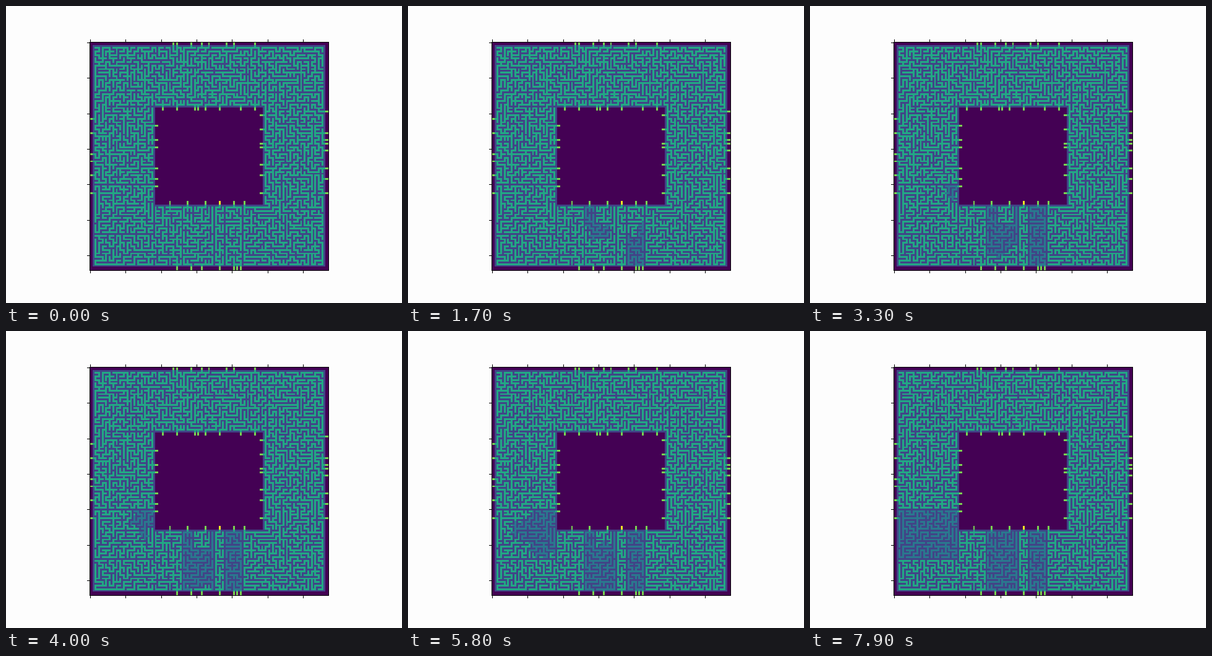
An HTML page with a canvas for the animation above (8 s loop, 640x480 px).

```html
<!DOCTYPE html>
<html lang="en">
<head>
<meta charset="utf-8">
<title>Maze search</title>
<style>
html, body { margin: 0; width: 640px; height: 480px; overflow: hidden; background: #fdfdfd; }
canvas { display: block; }
</style>
</head>
<body>
<canvas id="stage" width="640" height="480"></canvas>
<script>
const LOOP = 8000, STEP = 100;
const COLS = 135, ROWS = 129, RING = 35, EDGE = 2;
const SIZE = 369.6 / ROWS, LEFT = 328 - COLS * SIZE / 2, TOP = 57.6;
const INNER = EDGE + RING;
const COLOR = {
  page: '#fdfdfd', empty: '#440154', wall: '#414487', seen: '#2a788e',
  path: '#22a884', label: '#7ad151', start: '#fde725'
};

// Parts of the maze that get searched, each from its own entry cell
const FLOODS = [
  { cols: [59, 67], rows: [93, 101], entry: [61, 101], start: 4600, end: 7900 },
  { cols: [53, 69], rows: [93, 125], entry: [55, 93], start: 0, end: 4200 },
  { cols: [77, 85], rows: [93, 125], entry: [83, 125], start: 0, end: 2600 },
  { cols: [3, 35], rows: [81, 107], entry: [35, 81], start: 2800, end: 7900 }
];

// Openings along each side of the outer and the inner wall
const PORTALS = {
  outer: {
    top: [47, 49, 57, 63, 67, 77, 81, 93],
    bottom: [49, 57, 63, 73, 81, 83, 85],
    left: [43, 51, 63, 67, 75, 85],
    right: [39, 51, 55, 57, 61, 71, 77, 85]
  },
  inner: {
    top: [41, 49, 59, 61, 65, 73, 85, 93],
    bottom: [45, 55, 65, 73, 81, 87],
    left: [47, 55, 59, 71, 77, 81],
    right: [41, 49, 57, 59, 69, 75, 85]
  }
};

let seed = 20;
function random() {
  seed = (Math.imul(seed, 1664525) + 1013904223) >>> 0;
  return seed / 4294967296;
}
const pick = n => Math.floor(random() * n);

const key = (c, r) => r * COLS + c;
const within = (v, [low, high]) => v >= low && v <= high;
// Distance of a cell from the nearest outer edge
const inset = (c, r) => Math.min(c, r, COLS - 1 - c, ROWS - 1 - r);
const isRoom = (c, r) => c % 2 === 1 && r % 2 === 1 && inset(c, r) > EDGE && inset(c, r) < INNER;
const floodAt = (c, r) => FLOODS.find(f => within(c, f.cols) && within(r, f.rows));

const cells = new Map();   // open cells with their depth and, if searched, time

function growMaze(c0, r0) {
  const flood = floodAt(c0, r0);
  const first = { c: c0, r: r0, depth: 0, time: Infinity };
  const active = [first], found = [first];
  cells.set(key(c0, r0), first);
  while (active.length) {
    const at = random() < 0.55 ? active.length - 1 : pick(active.length);
    const room = active[at];
    const exits = [[1, 0], [-1, 0], [0, 1], [0, -1]].filter(([dc, dr]) => {
      const c = room.c + 2 * dc, r = room.r + 2 * dr;
      return isRoom(c, r) && !cells.has(key(c, r)) && floodAt(c, r) === flood;
    });
    if (!exits.length) {
      active.splice(at, 1);
      continue;
    }
    const [dc, dr] = exits[pick(exits.length)];
    for (const n of [1, 2]) {
      const cell = { c: room.c + n * dc, r: room.r + n * dr, depth: room.depth + n, time: Infinity };
      cells.set(key(cell.c, cell.r), cell);
      found.push(cell);
    }
    active.push(found[found.length - 1]);
  }
  if (flood) schedule(found, flood);
}

// Breadth-first order, gaining a little speed on the way
function schedule(found, { start, end }) {
  found.sort((a, b) => a.depth - b.depth);
  found.forEach((cell, i) => {
    const part = Math.pow((i + 1) / found.length, 0.8);
    cell.time = Math.ceil((start + (end - start) * part) / STEP) * STEP;
  });
}

for (const { entry: [c, r] } of FLOODS) growMaze(c, r);
for (let r = 1; r < ROWS; r += 2)
  for (let c = 1; c < COLS; c += 2)
    if (isRoom(c, r) && !cells.has(key(c, r))) growMaze(c, r);

function drawCells(g, c, r, color, w = 1, h = 1) {
  const x = Math.round(LEFT + c * SIZE), y = Math.round(TOP + r * SIZE);
  g.fillStyle = color;
  g.fillRect(x, y, Math.round(LEFT + (c + w) * SIZE) - x, Math.round(TOP + (r + h) * SIZE) - y);
}

function drawPortals(g) {
  for (const ring in PORTALS) {
    const outer = ring === 'outer';
    const label = outer ? 0 : INNER;
    const wall = outer ? EDGE : INNER - 1;
    for (const side in PORTALS[ring]) {
      const upright = side === 'left' || side === 'right';
      const far = side === 'bottom' || side === 'right';
      const span = upright ? COLS : ROWS;
      const labelAt = far ? span - label - 2 : label;
      const wallAt = far ? span - wall - 1 : wall;
      for (const p of PORTALS[ring][side]) {
        const color = ring === 'inner' && side === 'bottom' && p === 73 ? COLOR.start : COLOR.label;
        if (upright) {
          drawCells(g, labelAt, p, color, 2, 1);
          drawCells(g, wallAt, p, COLOR.path);
        } else {
          drawCells(g, p, labelAt, color, 1, 2);
          drawCells(g, p, wallAt, COLOR.path);
        }
      }
    }
  }
}

function drawAxes(g) {
  g.strokeStyle = g.fillStyle = '#000';
  g.strokeRect(135.5, 58.5, 386, 369);
  for (let n = 0; n < COLS; n += 20) {
    const x = Math.round(LEFT + (n + 0.5) * SIZE), y = Math.round(TOP + (n + 0.5) * SIZE);
    g.fillRect(x, 54, 1, 4);
    g.fillRect(x, 428, 1, 4);
    if (n < ROWS) g.fillRect(131, y, 4, 1);
  }
}

function makeBase() {
  const base = document.createElement('canvas');
  base.width = 640;
  base.height = 480;
  const g = base.getContext('2d');
  g.fillStyle = COLOR.page;
  g.fillRect(0, 0, 640, 480);
  for (const [gap, color] of [[0, COLOR.empty], [EDGE, COLOR.wall], [INNER, COLOR.empty]])
    drawCells(g, gap, gap, color, COLS - 2 * gap, ROWS - 2 * gap);
  for (const { c, r } of cells.values()) drawCells(g, c, r, COLOR.path);
  drawPortals(g);
  drawAxes(g);
  return base;
}

const ctx = document.getElementById('stage').getContext('2d');
const base = makeBase();
const begin = performance.now();
let shown = -1;

function render() {
  const time = Math.floor((performance.now() - begin) % LOOP / STEP) * STEP;
  if (time !== shown) {
    shown = time;
    ctx.drawImage(base, 0, 0);
    for (const cell of cells.values())
      if (cell.time <= time) drawCells(ctx, cell.c, cell.r, COLOR.seen);
  }
  requestAnimationFrame(render);
}
render();
</script>
</body>
</html>
```
